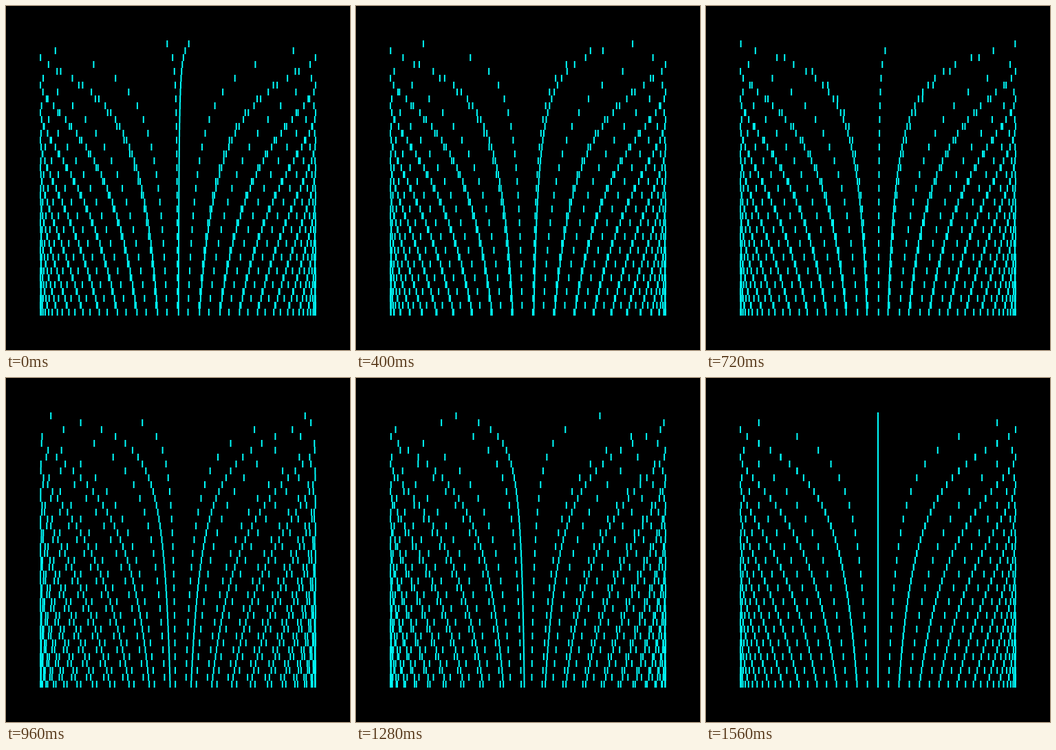
These frames come from a looping animation (500x500 px, 1600 ms). An HTML page with a canvas:

```html
<!DOCTYPE html>
<html lang="en">
<head>
<meta charset="utf-8">
<title>Turning rings</title>
<style>
  html, body { margin: 0; width: 100%; height: 100%; overflow: hidden; background: #000; }
  canvas { display: block; }
</style>
</head>
<body>
<canvas id="stage" width="500" height="500"></canvas>
<script>
const ctx = document.getElementById('stage').getContext('2d');
const LOOP = 1600, STEPS = 40;
const ROWS = 40, ROW_HEIGHT = 10, TOP = 50;
const CENTER = 250, RADIUS = 200, TICK = 2;

// Each row is a ring of n ticks seen edge-on; per loop it turns by one tick spacing.
function draw(turn) {
  ctx.fillStyle = '#000';
  ctx.fillRect(0, 0, 500, 500);
  ctx.fillStyle = '#0ff';
  for (let row = 0; row < ROWS; row++) {
    const n = row + 2;
    for (let i = 0; i < n; i++) {
      const x = CENTER + RADIUS * Math.sin(2 * Math.PI * (i + turn) / n);
      ctx.fillRect(x - TICK / 2, TOP + row * ROW_HEIGHT, TICK, ROW_HEIGHT);
    }
  }
}

function tick() {
  const step = Math.floor(performance.now() % LOOP / LOOP * STEPS);
  draw((step + 1) / STEPS);
  requestAnimationFrame(tick);
}

tick();
</script>
</body>
</html>
```
